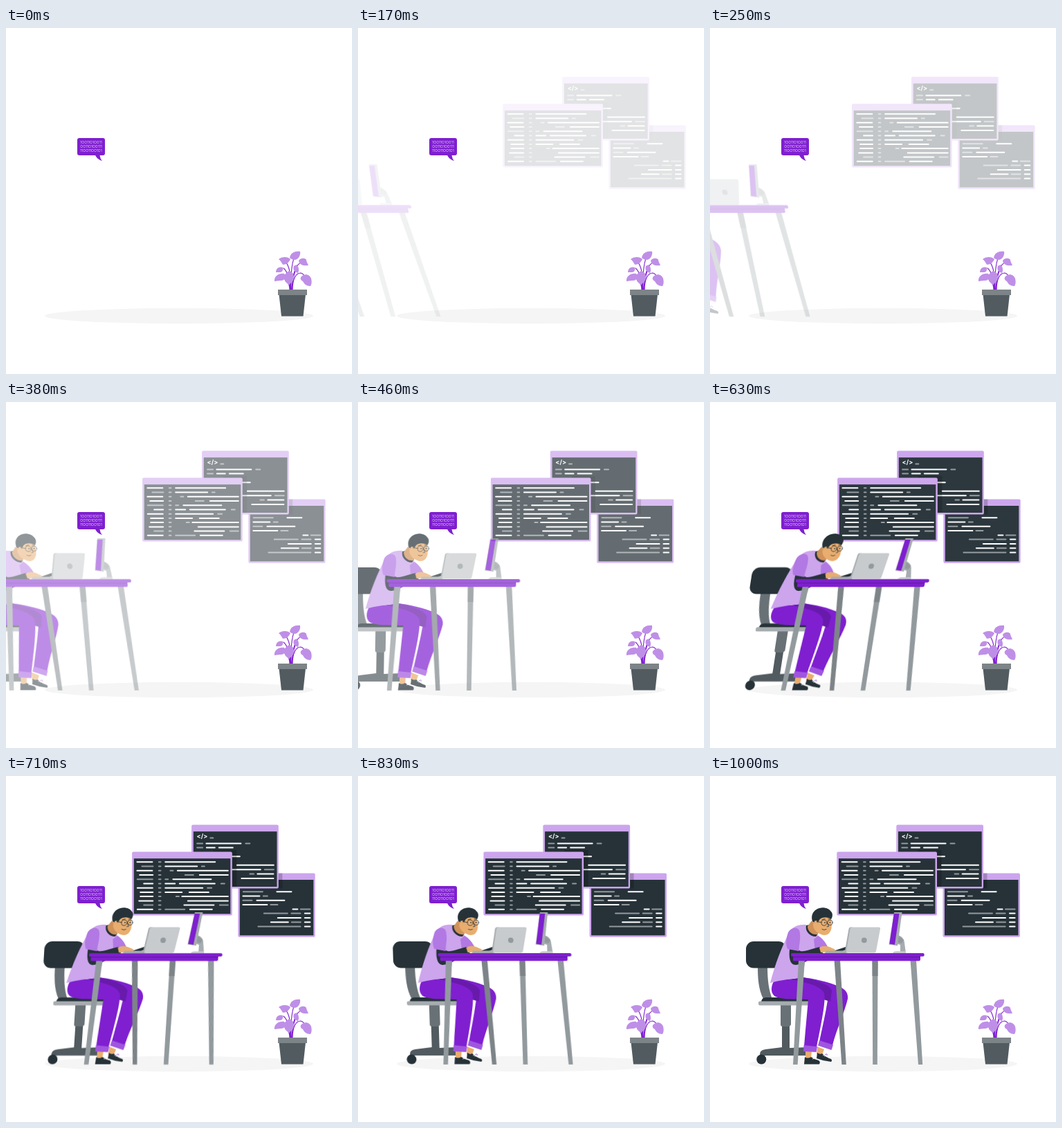
These frames come from a looping animation (500 px wide and 500 px high, 1040 ms). An HTML page:

```html
<!DOCTYPE html>
<html lang="en">
<head>
<meta charset="utf-8">
<title>Programmer at a desk</title>
<style>
  html, body { margin: 0; width: 100%; height: 100%; overflow: hidden; background: #fff; }
  svg { display: block; width: 100%; height: 100%; }

  .desk, .windows { animation: 1s both paused; }
  .desk { animation-name: rush; animation-timing-function: ease-in; transform-origin: 181px 303.5px; }
  .windows { animation-name: slide; animation-timing-function: cubic-bezier(.36, -.01, .5, 1.38); }
  @keyframes rush {
    0% { transform: translateX(-258px) skewX(20deg); opacity: 0; }
    60% { transform: skewX(-10deg); opacity: 1; }
    80% { transform: skewX(2deg); opacity: 1; }
    100% { transform: translateX(0); opacity: 1; }
  }
  @keyframes slide {
    0% { transform: translateX(30px); opacity: 0; }
    100% { transform: translateX(0); opacity: 1; }
  }

  .main { fill: #7f1fd0; }
  .deep { fill: #681aab; }
  .cuff { fill: #a055df; }
  .sleeve { fill: #b278e3; }
  .pale { fill: #cca5ed; }
  .leaf { fill: #bf8fe7; }
  .dark { fill: #263238; }
  .steel { fill: #515b60; }
  .iron { fill: #687176; }
  .ash { fill: #7d8488; }
  .gray { fill: #929a9e; }
  .silver { fill: #a6acaf; }
  .light { fill: #c8cbcd; }
  .skin { fill: #e8ad6f; }
  .tan { fill: #d0925a; }
  .stem, .line { fill: none; stroke-linecap: round; }
  .stem { stroke: #7f1fd0; stroke-width: 1.1; }
  .line { stroke: #263238; stroke-width: .8; }
  .code path { fill: none; stroke: #fff; stroke-width: 2; stroke-linecap: round; }
  .code .dim { stroke: #929a9e; }
  text { font-family: Inter, "Open Sans", sans-serif; fill: #fff; }
</style>
</head>
<body>
<svg viewBox="0 0 500 500">
  <ellipse cx="250" cy="416" rx="194" ry="11.2" fill="#f5f5f5"/>

  <!-- plant -->
  <g>
    <path class="stem" d="M411 379C411 366 407 352 401 347M412 379C411 360 411 344 403 337M412 379C412 356 412 343 417 330M413 379C414 358 417 342 428 338M413 379C414 366 416 355 419 349M410 379C410 368 404 361 396 360M414 379C414 362 419 354 426 354C430 355 432 359 433 363M411 379L409 362"/>
    <g class="leaf">
      <path d="M410 332C411 325 418 322 425 323C426 329 422 335 417 335C414 335 412 334 410 332Z"/>
      <path d="M394 334C399 330 407 330 411 334C409 339 405 342 400 342C398 339 397 336 394 334Z"/>
      <path d="M423 336C426 332 432 332 434 335C434 338 436 340 437 343C431 344 424 343 423 336Z"/>
      <path d="M390 353C390 347 395 344 400 346C401 350 399 353 396 353C394 353 392 353 390 353Z"/>
      <path d="M416 344L420 342C423 345 424 350 422 354C417 353 414 349 416 344Z"/>
      <path d="M388 366C387 359 394 354 402 355C406 360 402 366 396 365C393 365 390 366 388 366Z"/>
      <path d="M409 351C414 352 417 357 416 362C415 367 412 368 409 371C404 368 401 364 402 358C403 355 406 353 409 351Z"/>
      <path d="M427 359C432 354 439 356 441 362C442 366 442 370 440 373C434 373 431 370 429 366C425 364 425 361 427 359Z"/>
    </g>
    <path class="steel" d="M394.5 385H433L429.5 416.5H398Z"/>
    <rect class="ash" x="393" y="378" width="42" height="8"/>
  </g>

  <!-- speech bubble -->
  <path class="main" d="M106 159H140Q143 159 143 162V181Q143 184 140 184H135.5Q136 189 139 192Q132 190 129 184H106Q103 184 103 181V162Q103 159 106 159Z"/>
  <g font-size="5.1" font-weight="300" text-anchor="middle">
    <text x="123" y="167.1">1OO11O1OO11</text>
    <text x="123" y="173.1">OO11O1OO111</text>
    <text x="123" y="179.1">11OO11OO1O1</text>
  </g>

  <g class="windows">
    <g class="code">
      <rect class="pale" x="336.5" y="140.6" width="111.5" height="92.2" rx="2"/>
      <rect class="dark" x="339" y="150" width="106.5" height="80.3"/>
      <path d="M392.6 167.3h21M343.6 173.5h24M363.6 179.8h40M343.6 186h35M415.6 192.4h7M433 198.6h7.6M394 205h33M433 205h7.6M384 211.3h25M433 211.3h7.6M433 217.6h7.6"/>
      <path class="dim" d="M344 167.3h28M373 173.5h6M343.6 179.8h13M383.6 186h10M427 192.4h13.6M374 198.6h34M413.6 198.6h13M414 211.3h13M365.6 217.6h61"/>
      <path style="fill:#000;stroke:none" opacity=".2" d="M336.5 140.6H400.5V162.5H336.5Z"/>
    </g>
    <g class="code">
      <rect class="pale" x="269.3" y="70.5" width="125.7" height="92" rx="2"/>
      <rect class="dark" x="272" y="80.2" width="120.7" height="79.8"/>
      <text x="276.8" y="90.3" font-size="9" font-weight="700">&lt;/&gt;</text>
      <path d="M290.6 97.4h50M291 103.6h12M309 103.6h20M320 116.3h19M335 128.7h53M320 135.2h49M364.6 141.6h23M341.6 148h46"/>
      <path class="dim" d="M296.5 89.6h4M277.3 97.4h8M347.5 97.4h6M277.3 103.6h8M375 135.2h13M353.6 141.6h5.6"/>
      <path style="fill:#000;stroke:none" opacity=".2" d="M300 107H334.5V160H300Z"/>
    </g>
    <g class="code">
      <rect class="pale" x="183.3" y="109.6" width="144.7" height="92" rx="2"/>
      <rect class="dark" x="186" y="119.2" width="139.5" height="80"/>
      <path d="M190.6 124.3h22M190.6 136.7h22M194.4 143h19M200.4 155.4h13M191 161.7h22M195.4 167.9h18M195.4 174.1h18M193.4 180.4h20M191 192.8h22"/>
      <path d="M231.4 124.3h72M231.4 130.5h46M249 136.7h73M281 143h41M242.6 149.2h55M231.4 155.4h14M252 155.4h51M231.4 161.7h54M231.4 167.9h24M266 167.9h28M255.6 174.1h66.4M264 180.4h58M258.6 186.6h43M267 192.8h32"/>
      <path class="dim" d="M197.6 130.5h16M191 149.2h22M200.4 186.6h13M284 130.5h4M238.6 136.7h4M260 143h12M231.4 149.2h4M312 155.4h5M292.4 161.7h6M247 174.1h4M310 186.6h12M231.4 192.8h28"/>
      <path class="dim" id="marks"/>
    </g>
  </g>

  <g class="desk">
    <!-- chair -->
    <path class="iron" d="M69 275H83C83 295 85 310 90 322H77C70 308 69 292 69 275Z"/>
    <rect class="dark" x="52" y="239" width="58" height="38.5" rx="11"/>
    <path class="steel" d="M104 358H115V393L140 392Q146 393 146 404H72Q71 396 80 395L104 392Z"/>
    <path class="iron" d="M102 330H117V359Q116 362 113 362H105Q102 362 102 359Z"/>
    <circle class="dark" cx="74.3" cy="409.5" r="7"/>
    <path class="dark" d="M74 326Q75 320 81 320H146V326Z"/>
    <rect class="silver" x="70" y="325.5" width="77" height="6" rx="2"/>

    <!-- legs -->
    <path class="skin" d="M155 391L165 395L162 403L154 402ZM138 396H147L146 408H138Z"/>
    <path class="dark" d="M155 400Q159 403 162 401Q168 407 175 409Q177 411 175 413Q164 412 154 408ZM137 406Q141 409 146 406Q151 410 157 411Q160 413 158 416.5H136Z"/>
    <path d="M163 404l4-2M165 405l5-1M148 409l3-1" stroke="#fff" stroke-width=".8"/>
    <path d="M166 403q4-3 3 1" fill="none" stroke="#7f1fd0" stroke-width=".7"/>
    <path class="main" d="M130 291C150 292 172 298 186 304C196 308 200 314 199 322C195 340 183 366 177 389L158 384C162 364 167 344 170 324L125 305Z"/>
    <path class="cuff" d="M158 382L178 388.5L175.5 396L156 389.5Z"/>
    <path class="deep" d="M112 294L135 291C152 295 172 300 176 310Q175 318 174 326L164 323C152 309 130 302 112 300Z"/>
    <path class="main" d="M92 297C103 291 118 293 130 297C146 300 161 305 165 314C168 324 160 362 154 392L136 390C138 366 140 346 142 323C126 322 107 324 95 319C87 315 88 304 92 297Z"/>
    <path class="cuff" d="M135.5 389L155 391L153.5 399L135 398Z"/>

    <!-- upper body -->
    <path class="pale" d="M139 215C128 214 120 217 114 227C104 246 94 272 87 299C102 295 118 293 133 291L138 266L168 250L170 247C166 238 160 233 154 229Z"/>
    <path class="sleeve" d="M150 236L156 231C163 235 167 241 170 247L152 254Z"/>
    <path class="dark" d="M139 216C137 224 144 232 153 232L156 228L147 214Z"/>
    <path class="tan" d="M147 209L160 222L155 229C147 230 141 224 141 217Z"/>
    <path class="skin" d="M151 207L173 202C176 208 176 214 175.5 220C174 227 170 230 165 230C157 229 149 223 149 215Z"/>
    <path class="dark" d="M148 210C145 201 150 193 158 191C164 189 172 191 175 196C178 199 177 204 175 207C170 203 163 204 160 206C158 207 157 210 155 213L151 212Z"/>
    <ellipse class="skin" cx="153" cy="212.5" rx="2.6" ry="3.4"/>
    <g class="line">
      <circle cx="165" cy="212" r="4.1"/>
      <circle cx="173.4" cy="211.8" r="3.7"/>
      <path d="M161 211.5L154 210.5M162 207.6l4-1M171 206.6l3 .4M162 221.5Q165 223.5 168 221.5M170 213l1.5 4.4-2.5.4"/>
    </g>
    <circle class="dark" cx="166" cy="211.8" r=".9"/>
    <circle class="dark" cx="173.4" cy="211.6" r=".9"/>
    <path class="dark" d="M175 254L196 247L197 251L184 255.5Z"/>
    <path class="dark" d="M115 250L129 252C134 256 147 249 159 247L163 256C148 262 135 272 124 273C115 273 114 262 115 250Z"/>
    <path class="sleeve" d="M113 226C118 217 130 217 130 228C131 238 128 246 128.5 253L112 250C109 243 110 234 113 226Z"/>
    <path class="skin" d="M158 248C164 244 172 246 177 249C181 250 182 252 180 254L160 255Z"/>

    <!-- laptop and monitor -->
    <path class="silver" d="M168 252.5H198V256H166Z"/>
    <path class="silver" d="M203 218.5H206L199 255.5H194.5L200.5 221Q201 218.5 203 218.5Z"/>
    <path class="light" d="M205 218.5H244Q246.5 218.5 246 221L240 253Q239.5 255.5 237 255.5H196.5L202.5 221Q203 218.5 205 218.5Z"/>
    <circle class="gray" cx="222.8" cy="237.3" r="3.9"/>
    <path class="silver" d="M271 230C277 231 281 236 281 241L283 256H275L275 244L269 242Z"/>
    <path class="gray" d="M271 230L280 237L277 242L270 240Z"/>
    <path class="light" d="M264 256Q265 253.3 269 253.3H283V256Z"/>
    <path class="silver" d="M266 197H277.5L271 245.2L258.5 243.5Z"/>
    <path class="main" d="M265.8 198.8H273.5L267 243.8L259.4 242.6Z"/>

    <!-- table -->
    <path class="gray" d="M234.5 266H242.6L241.8 417H235.2Z"/>
    <path class="ash" d="M234.5 266H242.6L242.5 289H234.6Z"/>
    <path class="gray" d="M289.5 266H298L307.2 417H301ZM128 266H137L126.6 417H120Z"/>
    <path class="ash" d="M179.5 266H188L196.8 417H190.4Z"/>
    <path class="main" d="M120 259H304V265Q304 267.3 302 267.3H122Q119.5 267.3 120 265Z"/>
    <rect class="deep" x="120" y="260" width="184" height="2.4"/>
    <rect class="main" x="117" y="256" width="192.7" height="4.8" rx="2"/>
  </g>
</svg>
<script>
  const LOOP = 1040, FPS = 24, HOLD = 3, LEAD = 27;

  // Narrow column of marks, one per code row
  document.getElementById('marks').setAttribute('d',
    Array.from({ length: 12 }, (_, i) => `M222 ${124.3 + i * 6.227}h2.7`).join(''));

  const motions = document.getAnimations();
  motions.forEach(m => m.pause());

  // The scene advances at 24 steps a second, on a 10 ms clock
  function draw(now) {
    const clock = Math.floor(now % LOOP / 10) * 10;
    const step = Math.floor((clock + 4.9) * FPS / 1000);
    const time = step < HOLD ? 0 : Math.min(1000, step * 1000 / FPS + LEAD);
    motions.forEach(m => { m.currentTime = time; });
    requestAnimationFrame(draw);
  }
  draw(performance.now());
</script>
</body>
</html>
```
